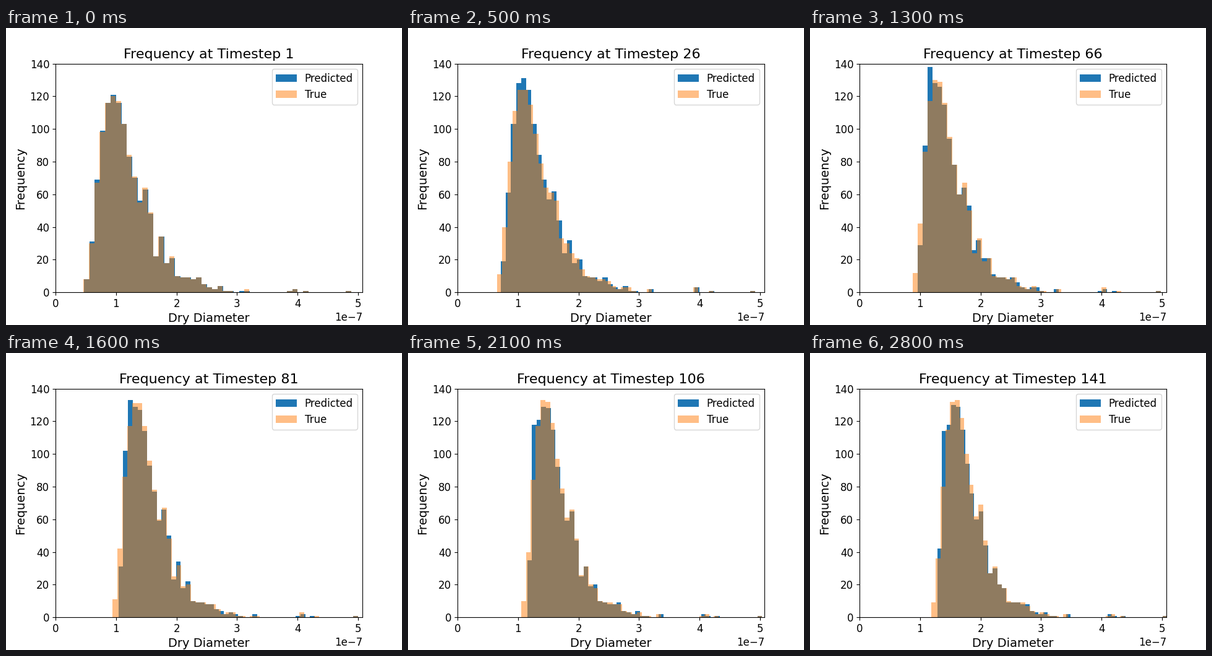
These frames come from a looping animation (640x480 px, 2.9 s). A matplotlib script:

```python
import matplotlib.pyplot as plt
import numpy as np
from matplotlib.animation import FuncAnimation

FRAMES, INTERVAL, STRIDE = 29, 100, 5
BINS = 50
UNIT = 1e-7  # all diameters below are in this unit

# Starting population: how many particles in each size class, then the few largest.
SMALLEST, LARGEST = 0.464, 4.885
CLASSES = [8, 30, 67, 98, 116, 120, 117, 103, 84, 71, 55, 64, 49, 22,
           34, 18, 22, 10, 9, 9, 8, 9, 5, 3, 2, 4, 1, 1]
TAIL = [3.119, 3.131, 3.889, 3.914, 3.93, 4.138, LARGEST]


def population():
    """Spread the particles evenly inside their size classes."""
    ranks = np.arange(sum(CLASSES)) + 0.5
    totals = np.cumsum([0] + CLASSES)
    width = (LARGEST - SMALLEST) / BINS
    body = np.interp(ranks, totals, SMALLEST + width * np.arange(len(totals)))
    body[0] = SMALLEST
    return np.concatenate([body, TAIL])


START = population()


def true_gain(step):
    """Growth of the squared diameter; small particles grow more slowly."""
    return (0.0142 - 0.0111 * np.exp(-START / 0.7)) * (step - 1)


def predicted_gain(step):
    """The prediction lets no particle grow slower than a power law."""
    return np.maximum(true_gain(step), 0.0147 * (step - 0.5) ** 0.928)


def histogram(gain, step):
    counts, edges = np.histogram(np.sqrt(START ** 2 + gain(step)), BINS)
    return counts, edges * UNIT


plt.rcParams.update({"font.family": "DejaVu Sans", "font.size": 12,
                     "axes.titlesize": 16, "axes.labelsize": 14})
fig, ax = plt.subplots(figsize=(6.4, 4.8), dpi=100)


def add_bars(gain, **style):
    return gain, ax.stairs(*histogram(gain, 1), fill=True, **style)


series = [add_bars(predicted_gain, color="C0", label="Predicted"),
          add_bars(true_gain, color="C1", alpha=0.5, label="True")]
ax.set_xlim(0, 5.072 * UNIT)
ax.set_ylim(0, 140)
ax.set_xlabel("Dry Diameter")
ax.set_ylabel("Frequency")
title = ax.set_title("")
ax.legend(loc="upper right")


def update(frame):
    step = 1 + STRIDE * frame
    title.set_text(f"Frequency at Timestep {step}")
    for gain, bars in series:
        bars.set_data(*histogram(gain, step))
    return [title] + [bars for _, bars in series]


anim = FuncAnimation(fig, update, frames=FRAMES, interval=INTERVAL, repeat=True)
plt.show()
```
